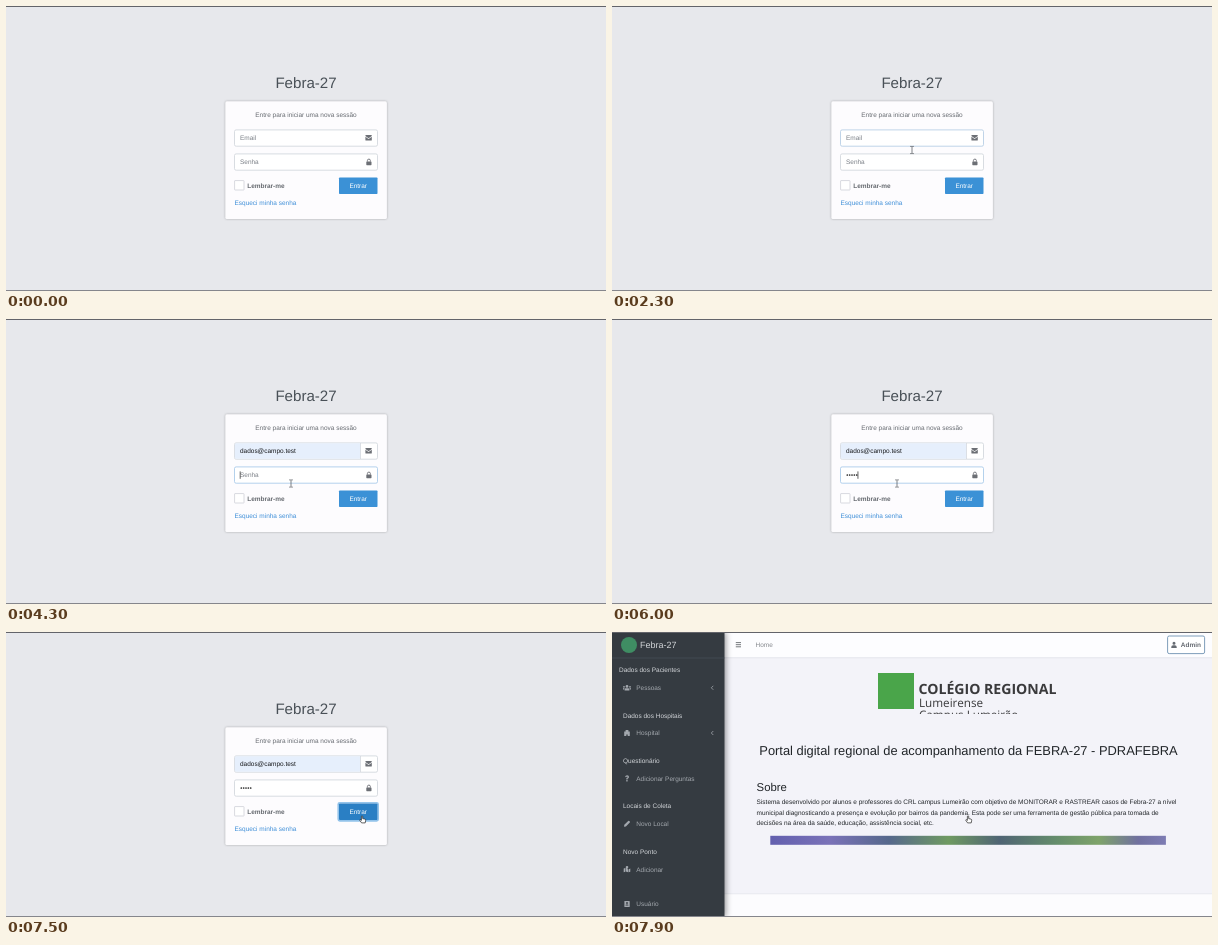
Animation, 600 px wide and 285 px high, one loop 8000 ms. Source, as an HTML page:

```html
<!DOCTYPE html>
<html lang="pt-BR">
<head>
<meta charset="utf-8">
<title>Login</title>
<style>
  html, body { margin: 0; width: 100%; height: 100%; overflow: hidden; background: #e7e8ec; }
  svg { display: block; width: 600px; height: 285px; }
  text { font: 6.48px "Liberation Sans", Arial, sans-serif; text-rendering: geometricPrecision; white-space: pre; }
  .mid { text-anchor: middle; }
  .bold { font-weight: 700; }
  .muted { fill: #666a70; }
  .hint { fill: #7a7f86; }
  .icon { fill: #6c6f75; }
  .field { fill: #fff; stroke: #cfd3da; stroke-width: .8; }
  .logo { font-family: "Open Sans", sans-serif; fill: #3a3a3c; }
  #card { filter: drop-shadow(0 .5px .8px rgba(0,0,0,.28)); }
  #sidebar { filter: drop-shadow(1px 0 3px rgba(0,0,0,.45)); }
  #menu text { fill: #a3a8ae; }
  #menu .head { fill: #d3d6da; }
  #menu path { fill: #a3a8ae; }
</style>
</head>
<body>
<svg viewBox="0 0 600 285">
  <defs>
    <linearGradient id="banner">
      <stop offset="0" stop-color="#625fae"/>
      <stop offset=".15" stop-color="#7a72b8"/>
      <stop offset=".3" stop-color="#55688c"/>
      <stop offset=".45" stop-color="#6f9a62"/>
      <stop offset=".58" stop-color="#4f6474"/>
      <stop offset=".72" stop-color="#648c6c"/>
      <stop offset=".83" stop-color="#7ea36a"/>
      <stop offset=".93" stop-color="#70709f"/>
      <stop offset="1" stop-color="#7d7cb4"/>
    </linearGradient>
    <clipPath id="logoClip"><rect x="260" y="36" width="200" height="46"/></clipPath>
  </defs>

  <g id="login">
    <rect width="600" height="285" fill="#e7e8ec"/>
    <text class="mid" x="300" y="81.8" fill="#495057" style="font-size:15.1px">Febra-27</text>
    <rect id="card" x="219.3" y="95.3" width="161.6" height="117.7" rx="1.6" fill="#fdfcfe"/>
    <text class="mid muted" x="300" y="111.3">Entre para iniciar uma nova sessão</text>

    <rect id="emailBox" class="field" x="228.5" y="123.9" width="143" height="16.3" rx="1.6"/>
    <g id="filled">
      <rect x="228.9" y="124.3" width="125.4" height="15.5" rx="1.2" fill="#e6effc"/>
      <path d="M354.5 124v16" stroke="#cfd3da" stroke-width=".7"/>
    </g>
    <text id="email" x="234" y="134.3"></text>
    <path id="underline" d="M234 135.5h56" stroke="#222" stroke-width=".6"/>
    <path class="icon" d="M359.4 129.6q0-.6.6-.6h5.2q.6 0 .6.6v.4l-3.2 2.3-3.2-2.3zM359.4 130.8l3.2 2.2 3.2-2.2v3.1q0 .6-.6.6H360q-.6 0-.6-.6z"/>

    <rect id="passBox" class="field" x="228.5" y="147.9" width="143" height="16.3" rx="1.6"/>
    <text id="pass" class="hint" x="234" y="158.3">Senha</text>
    <g id="dots" fill="#222"></g>
    <rect x="360.3" y="155.4" width="5.2" height="3.8" rx=".6" class="icon"/>
    <path d="M361.4 155.6v-1a1.5 1.5 0 0 1 3 0v1" fill="none" stroke="#6c6f75" stroke-width=".9"/>

    <path id="caret" stroke="#222" stroke-width=".7"/>

    <rect x="228.6" y="174.6" width="9.4" height="9.4" rx=".4" fill="#fff" stroke="#cfd0d7" stroke-width=".8"/>
    <text class="bold" x="241.2" y="181.6" fill="#666a70">Lembrar-me</text>
    <rect id="ring" x="332.2" y="170.7" width="40" height="18.2" rx="1.6" fill="none" stroke="#93c3ea" stroke-width="1.6"/>
    <rect id="button" x="333" y="171.5" width="38.5" height="16.6" rx=".8"/>
    <text class="mid" x="352.2" y="182.1" fill="#fff">Entrar</text>
    <text x="228.5" y="199.1" fill="#3f8fd8">Esqueci minha senha</text>
  </g>

  <g id="dashboard">
    <rect width="600" height="285" fill="#f3f3f9"/>
    <rect x="112" width="488" height="25.5" fill="#fdfdff"/>
    <path d="M112 25.8h488M112 262h488" stroke="#dcdfe5" stroke-width=".7"/>
    <rect x="112" y="262.3" width="488" height="23" fill="#fcfcfe"/>
    <path d="M123.8 10.6h5.2M123.8 12.7h5.2M123.8 14.8h5.2" stroke="#66696e" stroke-width=".9"/>
    <text x="143.5" y="15.2" fill="#85888d">Home</text>
    <rect x="555.6" y="4" width="37" height="17.6" rx="1.6" fill="#fff" stroke="#7194b4" stroke-width=".9"/>
    <path d="M562 9.8a1.5 1.5 0 1 1 0 3 1.5 1.5 0 0 1 0-3zM559.3 16v-1q0-1.8 1.8-1.8h1.8q1.8 0 1.8 1.8v1z" fill="#666b72"/>
    <text class="bold" x="568.8" y="15.2" fill="#666b72">Admin</text>

    <g clip-path="url(#logoClip)">
      <rect x="266" y="41" width="36" height="36" fill="#4aa54a"/>
      <text class="logo bold" x="306.5" y="62" style="font-size:14.1px">COLÉGIO REGIONAL</text>
      <text class="logo" x="307" y="74.7" style="font-size:11.7px">Lumeirense</text>
      <text class="logo" x="307" y="87" style="font-size:11.7px">Campus Lumeirão</text>
    </g>
    <text class="mid" x="356.5" y="123.2" fill="#212529" style="font-size:12.9px">Portal digital regional de acompanhamento da FEBRA-27 - PDRAFEBRA</text>
    <text x="144.6" y="158.8" fill="#212529" style="font-size:11.34px">Sobre</text>
    <g fill="#212529">
      <text x="144.6" y="172.3">Sistema desenvolvido por alunos e professores do CRL campus Lumeirão com objetivo de MONITORAR e RASTREAR casos de Febra-27 a nível</text>
      <text x="144.6" y="182.7">municipal diagnosticando a presença e evolução por bairros da pandemia. Esta pode ser uma ferramenta de gestão pública para tomada de</text>
      <text x="144.6" y="193.1">decisões na área da saúde, educação, assistência social, etc.</text>
    </g>
    <rect x="158.3" y="203.8" width="395.6" height="9" fill="url(#banner)"/>

    <rect id="sidebar" width="112.5" height="285" fill="#353b41"/>
    <circle cx="17" cy="13" r="8" fill="#3f8d63"/>
    <text x="28" y="16.2" fill="#d2d5d8" style="font-size:9px">Febra-27</text>
    <path d="M0 26h112.5" stroke="#4b545c" stroke-width=".6"/>
    <g id="menu"></g>
  </g>

  <path d="M0 .5h600" stroke="#63646a"/>
  <path d="M0 284.5h600" stroke="#85868c"/>

  <g id="cursor">
    <path data-kind="beam" d="M-1.8-3.6h1.2L0-3.2.6-3.6H1.8M0-3.2V3.2M-1.8 3.6h1.2L0 3.2.6 3.6H1.8" fill="none" stroke="#55585e" stroke-width=".75"/>
    <path data-kind="arrow" d="M-1.5-3.5v7.4l1.7-1.6 1.1 2.6 1.1-.5L1.3 1.9h2.3z" fill="#222" stroke="#fff" stroke-width=".5"/>
    <path data-kind="hand" d="M-1.1-3.3q.7-.8 1.3 0v2.4l2.2.5q.9.3.8 1.2l-.5 2.6H-.9L-2.7.9q-.1-.9.7-.7l.9.7z" fill="#fff" stroke="#222" stroke-width=".7"/>
  </g>
</svg>
<script>
const LOOP = 8000;
const EMAIL = "dados@campo.test";
const $ = id => document.getElementById(id);
const svgEl = (tag, attrs, parent) => {
  const el = document.createElementNS("http://www.w3.org/2000/svg", tag);
  for (const key in attrs) el.setAttribute(key, attrs[key]);
  return parent.appendChild(el);
};
const show = (el, on) => { el.style.display = on ? "" : "none"; };
const clamp = v => Math.max(0, Math.min(1, v));
const ease = v => v * v * (3 - 2 * v);
const mix = (a, b, k) => `rgb(${a.map((v, i) => Math.round(v + (b[i] - v) * k))})`;
const lastStep = (steps, t) => steps.filter(s => s[0] <= t).pop()[1];

// Icons are drawn around their own centre.
const icons = {
  users: "M0-2.8a1.4 1.4 0 1 1 0 2.8 1.4 1.4 0 0 1 0-2.8zM-2.4 2.6V1.8Q-2.4.4-1 .4H1Q2.4.4 2.4 1.8v.8zM-3-1.9a.9.9 0 1 1 0 1.8.9.9 0 0 1 0-1.8zM3-1.9a.9.9 0 1 1 0 1.8.9.9 0 0 1 0-1.8zM-4 1.8V1q0-.7.8-.7h.7L-2.9 1.8zM4 1.8V1Q4 .3 3.2.3h-.7L2.9 1.8z",
  hospital: "M-2.8 3v-4.5h1.4V-3h2.8v1.5h1.4V3H.7V1.4H-.7V3z",
  question: "M-1.9-1.5Q-1.6-3.2.1-3.2 2-3.1 2-1.5 1.9-.4.6.3v.7H-.7V-.3Q.6-.8.6-1.5.5-2 0-2q-.5 0-.7.8zM-.7 1.6H.6V3H-.7z",
  pencil: "M-3 3l.3-1.9L1.2-2.8q.5-.5 1 0l.6.6q.5.5 0 1L-1.1 2.7z",
  map: "M-3.3-.6l1.6-.6V2.5L-3.3 3zM-1.2-1.2L1.2.2V3L-1.2 2.4zM1.7 0L3.3-.8v3.3L1.7 3zM0-3.2q1.4 0 1.3 1.3Q1.1-1 0 0-1.2-1-1.3-1.9-1.3-3.2 0-3.2z",
  book: "M-2.6-3H2.2q.5 0 .5.5v5q0 .5-.5.5h-4.8zM0-1.9A.9.9 0 0 0 0-.1.9.9 0 0 0 0-1.9zM-1.5 1.6h3Q1.5.4.4.4H-.4Q-1.5.4-1.5 1.6z"
};
const menu = [
  { y: 38, x: 7, head: "Dados dos Pacientes" },
  { y: 55.8, icon: "users", label: "Pessoas", opens: true },
  { y: 83.5, head: "Dados dos Hospitais" },
  { y: 101, icon: "hospital", label: "Hospital", opens: true },
  { y: 129, head: "Questionário" },
  { y: 146.5, icon: "question", label: "Adicionar Perguntas" },
  { y: 174, head: "Locais de Coleta" },
  { y: 191.7, icon: "pencil", label: "Novo Local" },
  { y: 219.5, head: "Novo Ponto" },
  { y: 237.2, icon: "map", label: "Adicionar" },
  { y: 272, icon: "book", label: "Usuário" }
];
for (const { y, x = 11, head, icon, label, opens } of menu) {
  const text = svgEl("text", { x: head ? x : 24.3, y: y + 2.3, class: head ? "head" : "" }, $("menu"));
  text.textContent = head || label;
  if (icon) svgEl("path", { d: icons[icon], transform: `translate(15 ${y})` }, $("menu"));
  if (opens) svgEl("path", { d: `M101.3 ${y - 2}l-2 2 2 2`, style: "fill:none;stroke:#a3a8ae;stroke-width:.8" }, $("menu"));
}
const dots = Array.from({ length: 5 }, (_, i) =>
  svgEl("circle", { cx: 235.3 + i * 2.35, cy: 156, r: .85 }, $("dots")));

const emailSteps = [[0, 0], [2700, 1], [2900, 2], [3000, 3], [3100, EMAIL.length]];
const passSteps = [[0, 0], [4900, 1], [5200, 2], [5400, 3], [5700, 4], [5900, 5]];
// Pointer moves: start, end, from, to.
const moves = [
  [4000, 4300, [300, 144], [285, 164.5]],
  [6300, 7000, [285, 164.5], [356.5, 187.5]]
];

function pointerAt(t) {
  let pos = moves[0][2];
  for (const [start, end, from, to] of moves) {
    if (t < start) break;
    const k = ease(clamp((t - start) / (end - start)));
    pos = from.map((v, i) => v + (to[i] - v) * k);
  }
  return pos;
}

function focusBorder(box, t, start, end) {
  const k = clamp((t - start) / 150) - clamp((t - end) / 150);
  box.style.stroke = mix([207, 211, 218], [161, 198, 232], k);
}

function render(t) {
  const loggedIn = t >= 7800;
  show($("login"), !loggedIn);
  show($("dashboard"), loggedIn);

  const typed = lastStep(emailSteps, t);
  const complete = typed === EMAIL.length;
  $("email").textContent = typed ? EMAIL.slice(0, typed) : "Email";
  $("email").setAttribute("fill", typed ? "#16181b" : "#7a7f86");
  show($("filled"), complete);
  show($("underline"), complete && t < 4000);
  focusBorder($("emailBox"), t, 2200, 4100);

  const count = lastStep(passSteps, t);
  show($("pass"), !count);
  dots.forEach((dot, i) => show(dot, i < count));
  focusBorder($("passBox"), t, 4150, 7050);

  const onEmail = t >= 2400 && t < 4100;
  const onPass = t >= 4150 && t < 7050;
  show($("caret"), onEmail || onPass);
  if (onEmail) {
    const x = typed ? 234.6 + $("email").getComputedTextLength() : 234.2;
    $("caret").setAttribute("d", `M${x} 128.4v7.4`);
  } else if (onPass) {
    $("caret").setAttribute("d", `M${234.2 + count * 2.35} 152.4v7.4`);
  }

  const [x, y] = pointerAt(t);
  const overButton = x > 335 && y > 173;
  const kind = overButton ? "hand" : t > 6400 ? "arrow" : "beam";
  show($("cursor"), t >= 2200 && t < 2600 || t >= 4000);
  $("cursor").setAttribute("transform", `translate(${x} ${y})`);
  for (const shape of $("cursor").children) show(shape, shape.dataset.kind === kind);
  $("button").setAttribute("fill", overButton ? "#2a7fc4" : "#3b91d6");
  show($("ring"), t >= 7050);
}

const began = performance.now();
function tick() {
  render((performance.now() - began) % LOOP);
  requestAnimationFrame(tick);
}
tick();
</script>
</body>
</html>
```
